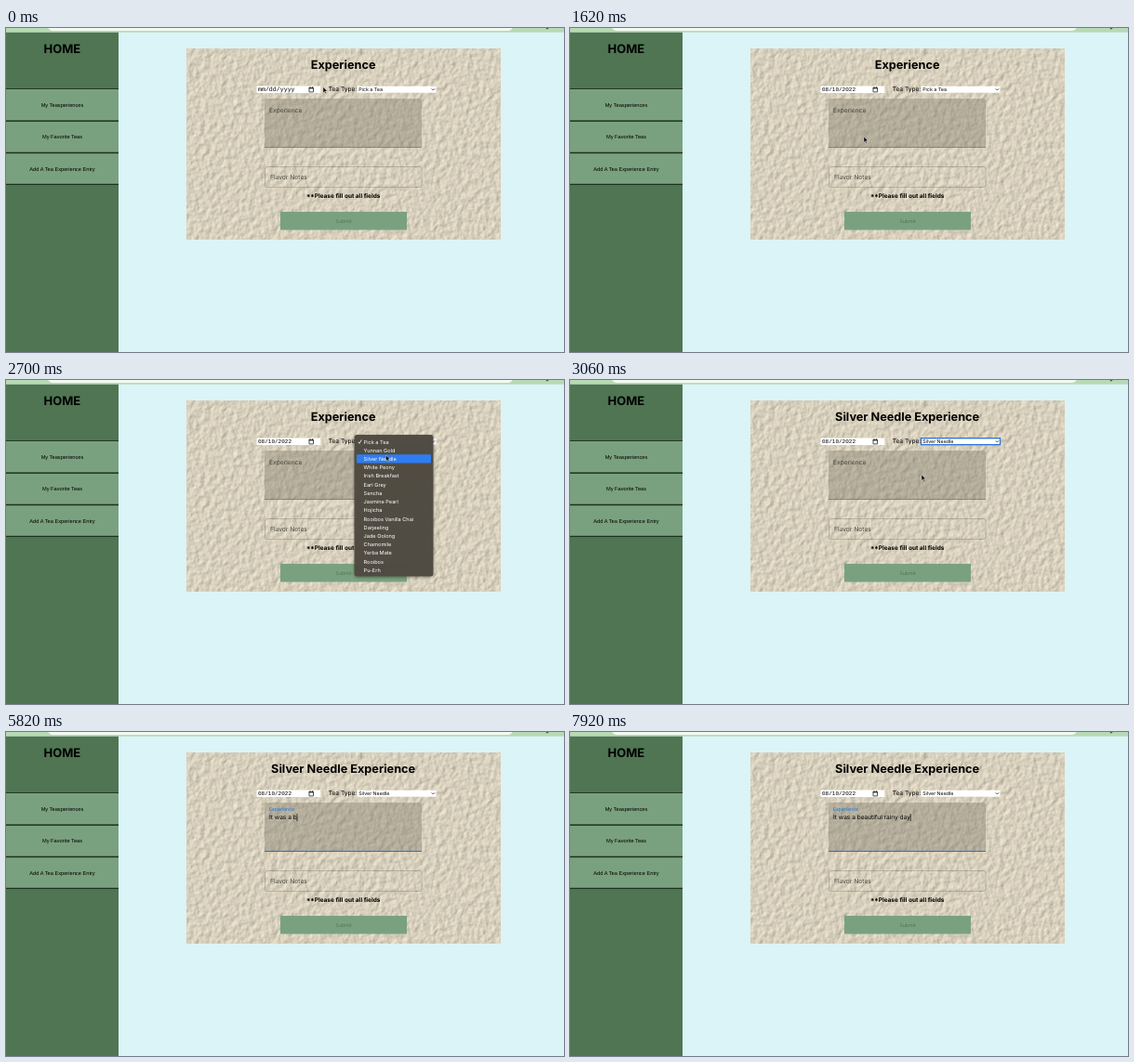
An HTML page that plays this animation: 600 px wide and 349 px high, repeating every 8 s.

```html
<!DOCTYPE html>
<html lang="en">
<head>
<meta charset="utf-8">
<title>Tea journal</title>
<style>
  html, body { margin: 0; width: 100%; height: 100%; overflow: hidden; background: #dbf4f7; }
  svg { display: block; width: 100%; height: 100%; font-family: Inter, "Open Sans", sans-serif; text-rendering: geometricPrecision; }
  .bold { font-weight: 700; }
  .mid { text-anchor: middle; }
  .nav { font: 5.7px "Liberation Sans", Arial, sans-serif; text-anchor: middle; }
  .mono { font-family: "Liberation Mono", monospace; }
  .tiny { font-size: 5.3px; }
  .blue { fill: #1a68d8; }
  .line { fill: none; stroke: #222; stroke-width: .8; }
</style>
</head>
<body>
<svg viewBox="0 0 600 349" preserveAspectRatio="none">
  <defs>
    <filter id="plaster" x="0" y="0" width="1" height="1" color-interpolation-filters="sRGB">
      <feTurbulence type="fractalNoise" baseFrequency=".17 .15" numOctaves="3" seed="8"/>
      <feDiffuseLighting surfaceScale=".75" diffuseConstant="1.17" lighting-color="#d5cdba">
        <feDistantLight azimuth="215" elevation="60"/>
      </feDiffuseLighting>
    </filter>
    <filter id="shadow" x="-.2" y="-.2" width="1.4" height="1.4">
      <feDropShadow dx="0" dy="1" stdDeviation="1.5" flood-opacity=".4"/>
    </filter>
  </defs>

  <rect width="600" height="349" fill="#dbf4f7"/>
  <rect width="600" height="4.7" fill="#b7dab5"/>
  <rect x="45" y="-8" width="500" height="11" rx="5" fill="#f3faf1"/>
  <path d="M581 1l3-2" stroke="#444" stroke-width="1.5"/>

  <rect y="4.7" width="121" height="345" fill="#4f7552"/>
  <text class="bold mid" x="60.3" y="26.7" font-size="13">HOME</text>
  <g id="nav"></g>

  <rect x="194" y="22" width="338" height="206" filter="url(#plaster)"/>
  <text id="title" class="bold mid" x="362.6" y="44" font-size="12.7"></text>

  <rect x="269.5" y="62.5" width="68.5" height="7.5" fill="#fff"/>
  <text id="date" class="mono" x="271" y="68.3"></text>
  <path d="M326 64.7h4.5v4.2h-4.5z" class="line"/>
  <path d="M325.6 64.8h5.3M327 63.3v1M329.5 63.3v1" stroke="#222"/>
  <text x="346.7" y="68.4" font-size="6.6">Tea Type:</text>
  <rect id="select" x="377.5" y="62.7" width="85" height="7" fill="#fff"/>
  <text id="tea" class="tiny" x="379.2" y="68.2"></text>
  <path d="M457.8 65.4l1.6 1.6 1.6-1.6" class="line"/>

  <path d="M278 129V78q0-2 2-2h165q2 0 2 2v51z" fill="#7a7464" fill-opacity=".38"/>
  <path id="underline" d="M278 128.5h169"/>
  <text id="label" x="283">Experience</text>
  <text id="entry" x="283" y="94.3" font-size="6.55"></text>
  <path id="caret" stroke="#000" stroke-width=".7"/>

  <rect x="278.5" y="149.5" width="168.5" height="22" rx="2" fill="none" stroke="#000" stroke-opacity=".25" stroke-width=".7"/>
  <text x="284" y="162.7" font-size="6.7" fill-opacity=".65">Flavor Notes</text>
  <text class="bold mid" x="362.7" y="183.2" font-size="6.5">**Please fill out all fields</text>
  <rect x="295" y="198" width="136" height="19.5" fill="#7aa17f"/>
  <text class="mid" x="363" y="209.8" font-size="5.3" fill="#4f7755">Submit</text>

  <g id="calendar" class="tiny">
    <rect x="270" y="70" width="91" height="117" rx="1" fill="#fff" filter="url(#shadow)"/>
    <text x="274.7" y="81" class="bold" font-size="5">August 2022</text>
    <path d="M306.3 78h3.2l-1.6 2.2z"/>
    <path class="line" d="M337.5 82.5v-6.5M334.7 78.8l2.8-2.8 2.8 2.8M350.7 76v6.5M347.9 79.7l2.8 2.8 2.8-2.8"/>
    <rect id="picked" y="112.7" width="11.4" height="11.4" rx="1" fill="#0b62f0"/>
    <g id="days" class="mid"></g>
    <text class="blue" x="279" y="180.5">Clear</text>
    <text class="blue" x="338.5" y="180.5">Today</text>
  </g>

  <g id="menu" font-size="5.6" fill="#fff">
    <rect x="374.5" y="59" width="85" height="152.5" rx="3" fill="#4f4a41" fill-opacity=".97" filter="url(#shadow)"/>
    <rect id="hover" x="377" width="80" height="9.3" rx="1" fill="#2f7df2"/>
    <path d="M378.8 66.8l1.2 1.6 2.3-4" fill="none" stroke="#fff" stroke-width=".8"/>
    <g id="teas"></g>
  </g>

  <path id="arrow" d="M0 0v6.2l1.4-1.3 1 2.3 1-.5-1-2.2h2z" stroke="#fff" stroke-width=".4"/>
  <path id="beam" d="M-1.3-3.5q1.3 0 1.3 1 0-1 1.3-1M0-2.5v5M-1.3 3.5q1.3 0 1.3-1 0 1 1.3 1" fill="none" stroke="#111" stroke-width=".6"/>
</svg>
<script>
const $ = id => document.getElementById(id);

function add(parent, tag, attrs, text = '') {
  const node = document.createElementNS('http://www.w3.org/2000/svg', tag);
  set(node, attrs);
  node.textContent = text;
  return parent.appendChild(node);
}
function set(node, attrs) {
  for (const key in attrs) node.setAttribute(key, attrs[key]);
}
function show(id, visible) {
  $(id).style.display = visible ? '' : 'none';
}

['My Teasperiences', 'My Favorite Teas', 'Add A Tea Experience Entry'].forEach((name, i) => {
  const y = 65.8 + i * 34.3;
  add($('nav'), 'rect', { y, width: 121, height: 34.3, fill: '#7aa17f' });
  add($('nav'), 'rect', { y: y - .7, width: 121, height: i ? 1.5 : .9, fill: '#1d3020' });
  add($('nav'), 'text', { class: 'nav', x: 60.5, y: y + 19.1 }, name);
});
add($('nav'), 'rect', { y: 167.8, width: 121, height: 1.2, fill: '#1d3020' });

const column = i => 280.5 + i * 11.72;
[...'SMTWTFS'].forEach((day, i) => add($('days'), 'text', { x: column(i), y: 96.6 }, day));
const cells = Array.from({ length: 42 }, (_, i) => {
  const day = i < 1 ? 31 : i > 31 ? i - 31 : i;
  return add($('days'), 'text', {
    x: column(i % 7), y: 108.6 + Math.floor(i / 7) * 11.75,
    fill: i < 1 || i > 31 ? '#888' : '#111'
  }, day);
});

const rowY = i => 66.4 + i * 9.23;
['Pick a Tea', 'Yunnan Gold', 'Silver Needle', 'White Peony', 'Irish Breakfast', 'Earl Grey',
  'Sencha', 'Jasmine Pearl', 'Hojicha', 'Rooibos Vanilla Chai', 'Darjeeling', 'Jade Oolong',
  'Chamomile', 'Yerba Mate', 'Rooibos', 'Pu-Erh'
].forEach((tea, i) => add($('teas'), 'text', { x: 384.6, y: rowY(i) + 2.1 }, tea));

// [time, x, y] of the pointer tip
const path = [
  [0, 341, 63.5], [60, 341, 63.5], [180, 331, 65], [360, 331, 65], [420, 329.5, 66], [780, 330, 66],
  [1440, 316, 117], [1620, 316, 117], [2160, 414.5, 67], [2400, 414.5, 67],
  [2700, 408.5, 81], [2880, 408, 83], [3060, 378, 102], [3180, 368, 105], [8000, 368, 105]
];
// [start, end, characters typed by the end]
const bursts = [[4620, 5160, 7], [5340, 5820, 10], [6000, 6360, 15], [6600, 7920, 28]];
const sentence = 'It was a beautiful rainy day';
const DATE = 1620, OPEN = 2400, CHOSEN = 2880, FOCUS = 3180, TYPE = 4620;

function pointer(t) {
  const i = path.findIndex(p => p[0] > t);
  const [t0, x0, y0] = path[i - 1], [t1, x1, y1] = path[i];
  const k = (t - t0) / (t1 - t0);
  return [x0 + (x1 - x0) * k, y0 + (y1 - y0) * k];
}

function typed(t) {
  let count = 0;
  for (const [start, end, total] of bursts) {
    if (t < start) break;
    count += Math.floor((total - count) * Math.min(1, (t - start) / (end - start)) + 1e-6);
  }
  return count;
}

function draw(t) {
  const [x, y] = pointer(t);
  const chosen = t >= CHOSEN, focused = t >= FOCUS, dated = t >= DATE;

  $('title').textContent = chosen ? 'Silver Needle Experience' : 'Experience';
  $('tea').textContent = chosen ? 'Silver Needle' : 'Pick a Tea';
  $('date').textContent = dated ? '08/10/2022' : 'mm/dd/yyyy';
  set($('date'), { 'font-size': dated ? 6 : 6.6 });
  set($('select'), { stroke: chosen && !focused ? '#2673dd' : 'none', 'stroke-width': 1.3 });

  show('calendar', t >= 780 && !dated);
  const day = t >= 1560 ? 10 : 7;
  set($('picked'), { x: column(day % 7) - 5.7 });
  cells.forEach((cell, i) => { cell.style.fill = i === day ? '#fff' : ''; });

  show('menu', t >= OPEN && !chosen);
  const row = Math.max(0, Math.round((y + 3 - rowY(0)) / 9.23));
  set($('hover'), { y: rowY(row) - 4.6 });

  const lift = Math.max(0, Math.min(1, (t - FOCUS) / 200));
  set($('label'), {
    y: 90.5 - 5.4 * lift, 'font-size': 6.7 - 1.6 * lift,
    fill: focused ? '#1976d2' : '#000', 'fill-opacity': focused ? 1 : .62
  });
  set($('underline'), { stroke: focused ? '#1976d2' : '#77736a', 'stroke-width': focused ? 1.2 : .7 });

  const count = typed(t);
  $('entry').textContent = sentence.slice(0, count);
  const end = 283.3 + (count ? $('entry').getSubStringLength(0, count) : 0);
  set($('caret'), { d: `M${end} 88.2v7.8` });
  show('caret', focused && (count > 0 || (t - FOCUS) % 1000 < 500));

  show('arrow', !focused);
  show('beam', focused && t < TYPE);
  for (const id of ['arrow', 'beam']) set($(id), { transform: `translate(${x} ${y})` });
}

function tick() {
  draw(Math.floor(performance.now() % 8000 / 60) * 60);
  requestAnimationFrame(tick);
}
tick();
</script>
</body>
</html>
```
